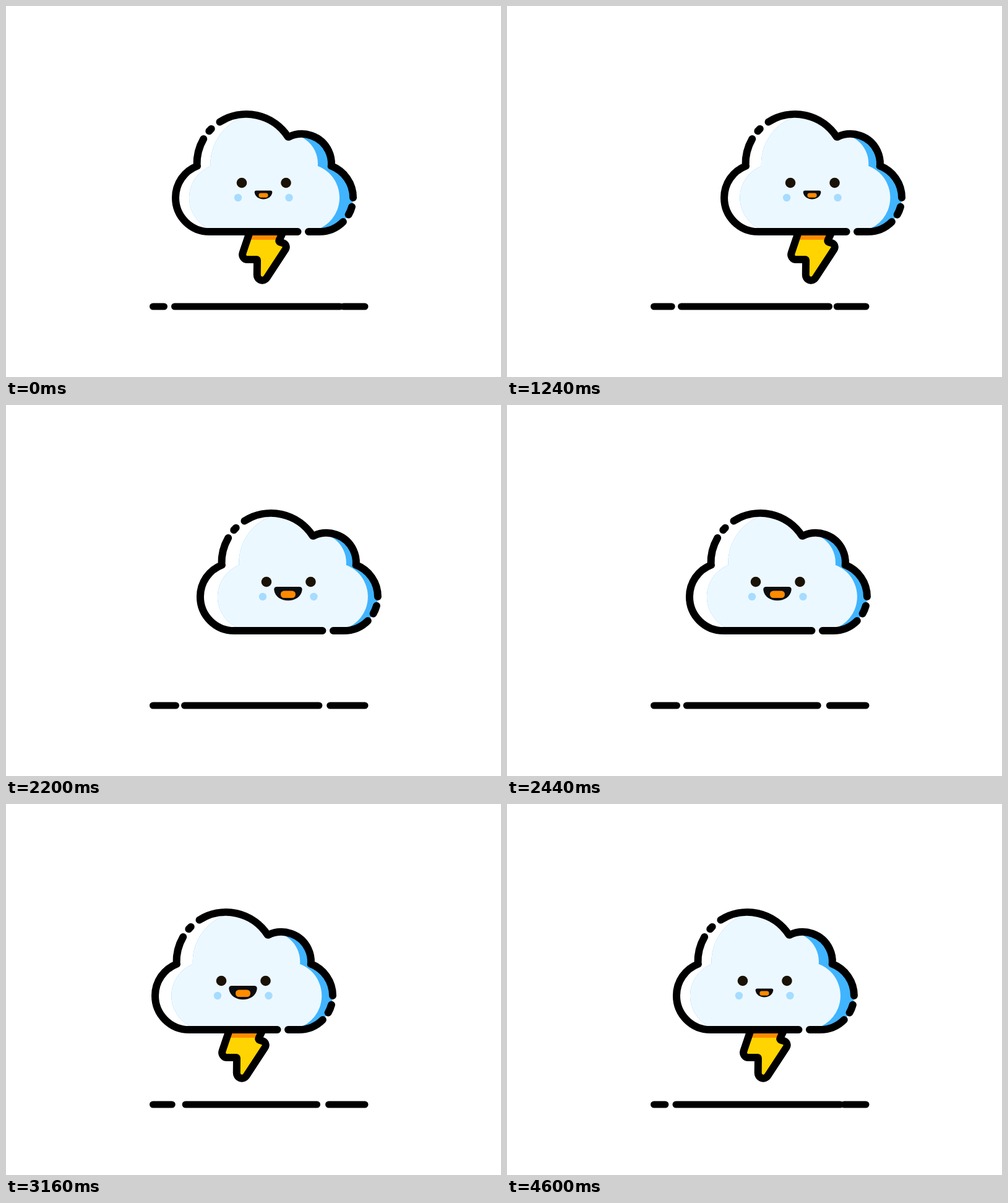
An HTML page with a canvas for the animation above (4.64 s loop, 800x600 px).

```html
<!DOCTYPE html>
<html lang="en">
<head>
<meta charset="utf-8">
<title>Storm cloud</title>
<style>
  html, body { margin: 0; width: 100%; height: 100%; overflow: hidden; background: #fff; }
  canvas { display: block; width: 800px; height: 600px; }
</style>
</head>
<body>
<canvas id="stage" width="800" height="600"></canvas>
<script>
const ctx = document.getElementById('stage').getContext('2d');
const LOOP = 4640;
const BLACK = '#000', YELLOW = '#ffd400', ORANGE = '#ff8a00', BLUE = '#228eff';
const SKY = '#40b4ff', PALE = '#ecf8ff', CHEEK = '#a6dcff', EYE = '#1a1206', MOUTH = '#0b0d10';
const BURSTS = [1640, 2600];

const rad = deg => deg * Math.PI / 180;
const clamp = v => Math.max(0, Math.min(1, v));
const lerp = (a, b, u) => a + (b - a) * u;
const smooth = u => (1 - Math.cos(Math.PI * clamp(u))) / 2;

function segment(keys, t) {
  let i = 0;
  while (i < keys.length - 2 && t >= keys[i + 1][0]) i++;
  return i;
}

function linear(keys, t) {
  const i = segment(keys, t), [t0, v0] = keys[i], [t1, v1] = keys[i + 1];
  return lerp(v0, v1, clamp((t - t0) / (t1 - t0)));
}

// Cubic Hermite through the keys, at rest at both ends.
function curve(keys, t) {
  const slope = i => i === 0 || i === keys.length - 1 ? 0
    : (keys[i + 1][1] - keys[i - 1][1]) / (keys[i + 1][0] - keys[i - 1][0]);
  const i = segment(keys, t), [t0, v0] = keys[i], [t1, v1] = keys[i + 1];
  const h = t1 - t0, u = (t - t0) / h, w = 1 - u;
  return v0 * (1 + 2 * u) * w * w + v1 * u * u * (3 - 2 * u)
    + h * u * w * (slope(i) * w - slope(i + 1) * u);
}

const DRIFT = [[0, 0], [560, 25], [1120, 70], [1240, 77], [1500, 82], [1760, 75], [2200, 40],
  [2680, 2], [3000, -24], [3180, -33.5], [3360, -32], [3840, -17], [4640, 0]];
const BOLT_SIZE = [[0, 1], [1560, 1], [1680, 0], [2500, 0], [2620, 1.1], [2680, 1.04], [2720, 1], [LOOP, 1]];
const FLASH = [[0, 0], [40, 0.3], [80, 0.24], [120, 0.185], [200, 0]];
const GAPS = [
  [[0, 261], [2320, 281], [LOOP, 261]],
  [[0, 267], [2880, 288], [LOOP, 267]],
  [[0, 545], [2880, 501], [LOOP, 545]],
  [[0, 540], [2880, 511.5], [LOOP, 540]]
];

// Cloud lobes: centre and radius
const LEFT = [329, 310, 55], TOP = [388.5, 255, 80], SIDE = [478, 255, 48], RIGHT = [506, 310, 55];

function lobe(path, [x, y, r], from, to, dx = 0) {
  path.arc(x + dx, y, r, rad(from), rad(to));
}

function cloudShape(dx = 0) {
  const p = new Path2D();
  lobe(p, LEFT, 90, 248.7, dx);
  lobe(p, TOP, 178, 327.3, dx);
  lobe(p, SIDE, 244.5, 363, dx);
  lobe(p, RIGHT, -69, 90, dx);
  p.closePath();
  return p;
}

const OUTLINE = (() => {
  const p = new Path2D();
  p.moveTo(471.5, 365);
  lobe(p, LEFT, 90, 248.7);
  lobe(p, TOP, 178, 210);
  const part = (l, from, to) => {
    p.moveTo(l[0] + l[2] * Math.cos(rad(from)), l[1] + l[2] * Math.sin(rad(from)));
    lobe(p, l, from, to);
  };
  part(TOP, 221.2, 224.8);
  part(TOP, 237.5, 327.3);
  lobe(p, SIDE, 244.5, 363);
  lobe(p, RIGHT, -69, 0);
  part(RIGHT, 15.5, 30);
  part(RIGHT, 45, 90);
  p.lineTo(489, 365);
  return p;
})();

const BOLT = (() => {
  const p = new Path2D();
  p.moveTo(394.5, 364);
  p.arcTo(379, 410, 406, 410, 8);
  p.arcTo(406, 410, 405.5, 464, 1);
  p.arcTo(405.5, 464, 456.6, 386, 8.5);
  p.arcTo(456.6, 386, 440.5, 381, 7);
  p.arcTo(440.5, 381, 448.5, 364, 2);
  p.lineTo(448.5, 364);
  return p;
})();

function ink(color, width) {
  ctx.strokeStyle = color;
  ctx.lineWidth = width;
  ctx.lineCap = ctx.lineJoin = 'round';
}

function disc(x, y, r, color) {
  ctx.fillStyle = color;
  ctx.beginPath();
  ctx.arc(x, y, r, 0, 2 * Math.PI);
  ctx.fill();
}

function spokes(count, inner, outer, color, width) {
  ink(color, width);
  ctx.beginPath();
  for (let i = 0; i < count; i++) {
    const a = 2 * Math.PI * i / count, c = Math.cos(a), s = Math.sin(a);
    ctx.moveTo(c * inner, s * inner);
    ctx.lineTo(c * outer, s * outer);
  }
  ctx.stroke();
}

const cross = color => () => spokes(4, 0, 9, color, 6);
const dot = () => disc(0, 0, 6.5, YELLOW);
const star = () => spokes(8, 7, 15.5, BLUE, 4);
function ring() {
  ink(ORANGE, 5);
  ctx.beginPath();
  ctx.arc(0, 0, 9, 0, 2 * Math.PI);
  ctx.stroke();
}

// x and y are the place at 84 % of the travel (dx, dy)
const SPARKS = [
  { draw: cross(YELLOW), x: 228, y: 239, dx: -70, dy: -67, turn: 40, angle: 28 },
  { draw: cross(BLUE), x: 290, y: 237.5, dx: -62, dy: -68, turn: 40, angle: 27 },
  { draw: ring, x: 244.5, y: 302, dx: -112, dy: -30, turn: 0, angle: 0 },
  { draw: star, x: 241, y: 280, dx: -190, dy: -62, turn: 40, angle: 28 },
  { draw: dot, x: 213.5, y: 320.5, dx: -70, dy: -68, turn: 0, angle: 0 },
  { draw: cross(BLUE), x: 504, y: 181, dx: 84, dy: -75, turn: -230, angle: -28 },
  { draw: cross(YELLOW), x: 570, y: 182, dx: 76, dy: -75, turn: -230, angle: -28 },
  { draw: dot, x: 585, y: 272, dx: 74, dy: -70, turn: 0, angle: 0 }
];

function drawSparks(age) {
  if (age <= 0 || age >= 400) return;
  const travel = 1 - (1 - clamp(age / 200)) ** 2;
  const size = clamp(age / 125) * (1 - smooth((age - 240) / 160));
  for (const s of SPARKS) {
    const k = travel - 0.84;
    ctx.save();
    ctx.translate(s.x + k * s.dx, s.y + k * s.dy);
    ctx.rotate(rad(s.angle + k * s.turn));
    ctx.scale(size, size);
    s.draw();
    ctx.restore();
  }
}

function drawFlash(age) {
  if (age <= 0 || age >= 200) return;
  const mix = clamp((age - 40) / 80);
  const [r, g, b] = [lerp(255, 54, mix), lerp(205, 189, mix), lerp(0, 255, mix)];
  ctx.fillStyle = `rgba(${r}, ${g}, ${b}, ${linear(FLASH, age)})`;
  ctx.fillRect(0, 0, 800, 600);
}

function drawBolt(size) {
  if (size <= 0) return;
  ctx.save();
  ctx.translate(418, 365);
  ctx.scale(size, size);
  ctx.translate(-418, -365);
  ctx.fillStyle = YELLOW;
  ctx.fill(BOLT);
  ctx.save();
  ctx.clip(BOLT);
  ctx.fillStyle = ORANGE;
  ctx.fillRect(370, 360, 100, 18);
  ctx.restore();
  ink(BLACK, 12);
  ctx.stroke(BOLT);
  ctx.restore();
}

function drawMouth(size) {
  ctx.save();
  ctx.translate(416, 306);
  ctx.scale(size, size);
  ctx.fillStyle = MOUTH;
  ctx.beginPath();
  ctx.moveTo(-18, -12);
  ctx.lineTo(18, -12);
  ctx.quadraticCurveTo(23, -12, 22.7, -7);
  ctx.bezierCurveTo(20, 16, -20, 16, -22.7, -7);
  ctx.quadraticCurveTo(-23, -12, -18, -12);
  ctx.fill();
  ctx.fillStyle = ORANGE;
  ctx.beginPath();
  ctx.roundRect(-12, -5.5, 24, 11.5, 5.5);
  ctx.fill();
  ctx.restore();
}

function drawCloud(t) {
  const shade = 3 * (1 - Math.cos(2 * Math.PI * t / LOOP));
  ctx.save();
  ctx.clip(cloudShape());
  const body = cloudShape(22 + shade);
  body.rect(430, 150, 200, 230);
  ctx.clip(body);
  ctx.fillStyle = SKY;
  ctx.fillRect(250, 150, 350, 230);
  ctx.fillStyle = PALE;
  const light = cloudShape(shade - 22);
  light.rect(250, 150, 216 + shade, 230);
  ctx.fill(light);
  ctx.restore();

  ink(BLACK, 12);
  ctx.stroke(OUTLINE);
  for (const x of [381, 452.5]) disc(x, 286, 8.3, EYE);
  for (const x of [375, 457.5]) disc(x, 310, 6.2, CHEEK);
  const open = smooth((t - 1580) / 140) - smooth((t - 4000) / 240);
  drawMouth(lerp(0.63, 1, open));
}

function drawGround(t) {
  const [a, b, c, d] = GAPS.map(keys => linear(keys, t));
  ink(BLACK, 11);
  ctx.beginPath();
  for (const [from, to] of [[232, a], [b, c], [d, 585.5]]) {
    ctx.moveTo(from + 5.5, 486);
    ctx.lineTo(to - 5.5, 486);
  }
  ctx.stroke();
}

function draw(t) {
  ctx.fillStyle = '#fff';
  ctx.fillRect(0, 0, 800, 600);
  for (const start of BURSTS) drawSparks(t - start);
  ctx.save();
  ctx.translate(curve(DRIFT, t), 0);
  drawBolt(linear(BOLT_SIZE, t));
  drawCloud(t);
  ctx.restore();
  drawGround(t);
  for (const start of BURSTS) drawFlash(t - start);
}

const began = performance.now();
function tick() {
  draw((performance.now() - began) % LOOP);
  requestAnimationFrame(tick);
}
tick();
</script>
</body>
</html>
```
